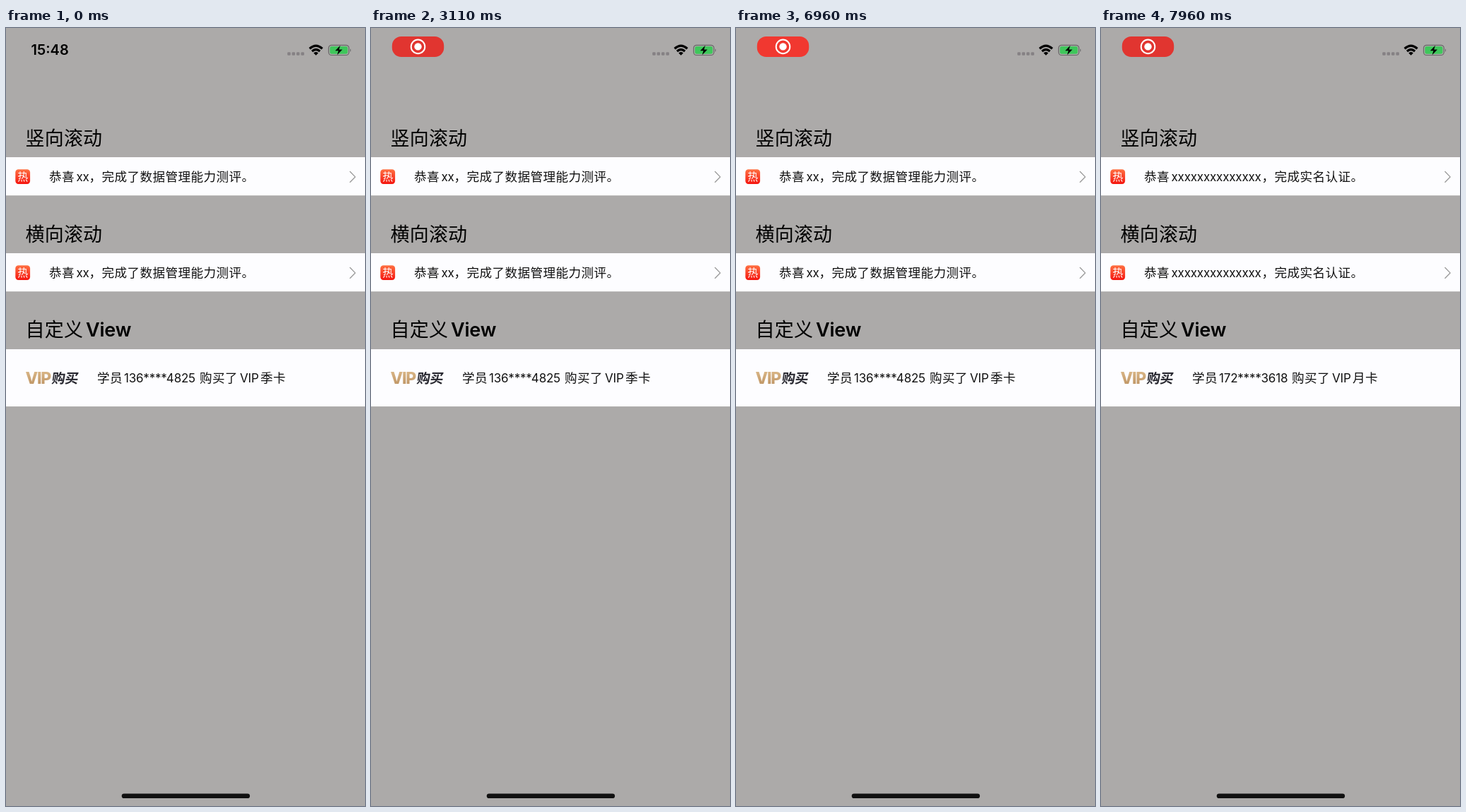
Write an HTML page that moves like this. It is 508x1102 px and loops after 8 s.

```html
<!DOCTYPE html>
<html lang="zh-CN">
<head>
<meta charset="utf-8">
<style>
html, body { margin: 0; width: 100%; height: 100%; overflow: hidden; background: #acaaa9; }
svg { display: block; }
text { font: 400 17px Inter, 'Noto Sans CJK SC', sans-serif; fill: #111; letter-spacing: -.2px; }
.cjk { font: 400 17.6px 'Noto Sans CJK SC', 'Noto Sans CJK', sans-serif; letter-spacing: .4px; }
.title { font-size: 27px; font-weight: 500; fill: #000; letter-spacing: .2px; }
.view { font-size: 27px; font-weight: 600; fill: #000; }
.clock { font-size: 20px; font-weight: 600; fill: #000; letter-spacing: 0; }
.hot { font-size: 15px; font-weight: 500; fill: #fff; letter-spacing: 0; text-anchor: middle; }
.vip { font-size: 23px; font-weight: 800; fill: url(#gold); letter-spacing: -1.3px; }
.buy { font-size: 19px; font-weight: 900; fill: #26262e; letter-spacing: -.3px; }
</style>
</head>
<body>
<svg id="stage" width="508" height="1102" viewBox="0 0 508 1102"></svg>
<script>
const LOOP = 8000;
const text = (x, y, cls, s) => `<text x="${x}" y="${y}" class="${cls}">${s}</text>`;

// Notice item, drawn inside a 508 x 54 cell
const notice = (name, commaX, message) => `
  <rect x="13.3" y="17.3" width="20.8" height="20.6" rx="4.2" fill="url(#red)"/>
  ${text(23.7, 33.1, 'hot', '热')}
  ${text(61, 34.2, 'cjk', '恭喜')}${text(99.5, 34, '', name)}
  ${text(commaX, 34.2, 'cjk', '，' + message)}
  <path d="M486.5 20l7.6 7.9-7.6 7.9" fill="none" stroke="#999" stroke-width="1.3"/>`;

// Purchase item, drawn inside a 508 x 81 cell
const purchase = (phone, buyX, card) => `
  ${text(27.5, 49.3, 'vip', 'VIP')}
  <g transform="translate(64 48.2) skewX(-8)">${text(0, 0, 'buy', '购买')}</g>
  ${text(129, 47.2, 'cjk', '学员')}${text(167, 47, '', phone)}
  ${text(buyX, 47.2, 'cjk', '购买了')}${text(buyX + 57, 47, '', 'VIP')}
  ${text(buyX + 86, 47.2, 'cjk', card)}`;

// White strip holding two items: the second lies below or to the right
const strip = (id, y, h, dx, dy, first, second) => `
  <svg y="${y}" width="508" height="${h}" overflow="hidden">
    <rect width="508" height="${h}" fill="#fdfdff"/>
    <g id="${id}"><g>${first}</g><g transform="translate(${dx} ${dy})">${second}</g></g>
  </svg>`;

const noticeA = notice('xx', 117.5, '完成了数据管理能力测评。');
const noticeB = notice('x'.repeat(14), 227.5, '完成实名认证。');
const gradient = (id, from, to) => `
  <linearGradient id="${id}" x2="0" y2="1"><stop stop-color="${from}"/><stop offset="1" stop-color="${to}"/></linearGradient>`;
const dots = [400.4, 406.8, 413.2, 419.6].map(x =>
  `<rect x="${x - 2.2}" y="34.2" width="4.5" height="4.5" rx="1.3" fill="#858184"/>`).join('');

document.getElementById('stage').innerHTML = `
  <defs>${gradient('red', '#ff7042', '#f4150f')}${gradient('gold', '#dfbd8d', '#b88d5d')}</defs>
  <rect width="508" height="1102" fill="#acaaa9"/>
  <g id="clock">${text(35.5, 38.3, 'clock', '15:48')}</g>
  <g id="pill">
    <rect id="pillBody" x="29.8" y="12" width="73.4" height="29" rx="13"/>
    <circle cx="66.5" cy="26.4" r="9.8" fill="none" stroke="#fff" stroke-width="2"/>
    <circle cx="66.5" cy="26.4" r="5.2" fill="#fff"/>
  </g>
  ${dots}
  <g fill="none" stroke="#000" stroke-width="3.2">
    <path d="M429.6 29.2q9-8.2 18 0M433 33q5.6-5 11.2 0"/>
    <path d="M435.3 35.4q3.3-2.7 6.6 0l-3.3 3.4z" fill="#000" stroke="none"/>
  </g>
  <rect x="456.5" y="24.3" width="28.8" height="14.2" rx="4.2" fill="none" stroke="#686768" stroke-width="1.2"/>
  <rect x="458.3" y="26.1" width="25.2" height="10.6" rx="2.7" fill="#3fc65b"/>
  <path d="M487 29.3q2.2 2.1 0 4.6z" fill="#686768"/>
  <path d="M473 24.8l-7.2 7.5h4.6l-1.8 6 7.4-7.9h-4.8z" fill="#000"/>
  ${text(27.5, 165.8, 'cjk title', '竖向滚动')}
  ${strip('vertical', 183, 54.4, 0, 54.4, noticeA, noticeB)}
  ${text(27.5, 301.6, 'cjk title', '横向滚动')}
  ${strip('horizontal', 319, 54.4, 508, 0, noticeA, noticeB)}
  ${text(27.5, 437.4, 'cjk title', '自定义')}${text(113, 437.2, 'view', 'View')}
  ${strip('custom', 455, 81.2, 0, 81.2,
    purchase('136****4825', 274, '季卡'), purchase('172****3618', 270, '月卡'))}
  <rect x="163.7" y="1084.4" width="181.4" height="6.7" rx="3.35" fill="#111"/>`;

const el = id => document.getElementById(id);
const progress = (t, start, length) => Math.min(1, Math.max(0, (t - start) / length));
const ease = p => p * p * (3 - 2 * p);
const shift = (id, x, y) => el(id).setAttribute('transform', `translate(${x} ${y})`);

function draw(t) {
  const shown = progress(t, 30, 220);
  el('clock').setAttribute('opacity', 1 - shown);
  el('pill').setAttribute('opacity', shown);
  const glow = Math.cos(2 * Math.PI * (t / 2420 - 0.66));
  el('pillBody').setAttribute('fill', `rgb(${237 + 17 * glow} ${55.5 + 3.5 * glow} 48)`);

  shift('vertical', 0, -54.4 * ease(progress(t, 7122, 300)));
  shift('horizontal', -508 * ease(progress(t, 7133, 300)), 0);
  shift('custom', 0, -81.2 * ease(progress(t, 7134, 300)));
}

function tick() {
  draw(performance.now() % LOOP);
  requestAnimationFrame(tick);
}
tick();
</script>
</body>
</html>
```
